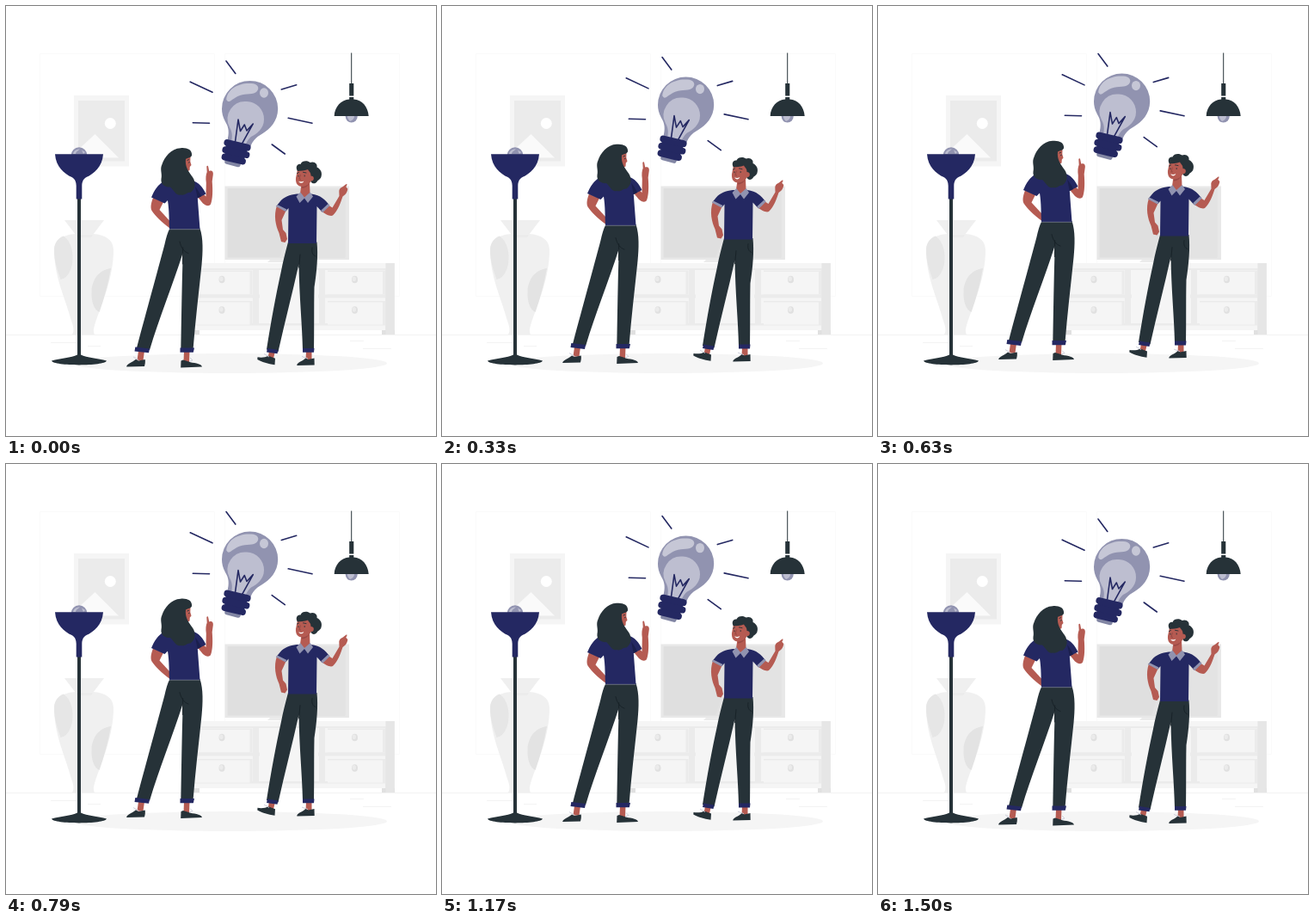
These frames come from a looping animation (500 by 500 pixels, 1.54 s). An HTML page:

```html
<!DOCTYPE html>
<html lang="en">
<head>
<meta charset="utf-8">
<title>Bright idea</title>
<style>
  html, body { margin: 0; width: 100%; height: 100%; overflow: hidden; background: #fff; }
  svg { display: block; width: 100vw; height: 100vh; }
  .navy { fill: #242862; }
  .fold { fill: #1b1f4d; }
  .dark { fill: #263238; }
  .skin { fill: #b55b52; }
  .shade { fill: #9b4a45; }
  .lilac { fill: #9193b0; }
  .pale { fill: #bdbed0; }
  .g1 { fill: #f5f5f5; }
  .g2 { fill: #ebebeb; }
  .g3 { fill: #e0e0e0; }
  .line { fill: none; stroke: #242862; stroke-width: 1.6; stroke-linecap: round; stroke-linejoin: round; }
  .faint { fill: none; stroke: #fafafa; stroke-width: 1; }
  .floor { fill: none; stroke: #f3f3f3; stroke-width: 1; }
  .crease { fill: none; stroke: #172126; stroke-width: .9; stroke-linecap: round; }
  .lace { fill: none; stroke: #c9cad8; stroke-width: .9; }
</style>
</head>
<body>
<svg viewBox="0 0 500 500">
  <defs>
    <g id="drawer">
      <rect class="g2" width="67" height="28"/>
      <rect class="g1" width="64" height="26" y="1.5"/>
      <ellipse class="g3" cx="31.5" cy="10.5" rx="3.5" ry="4.3"/>
      <ellipse class="g2" cx="30.8" cy="9.8" rx="2.2" ry="2.8"/>
    </g>
  </defs>

  <!-- room -->
  <path class="faint" d="M39.500 55.500H242.500V337.500H39.500ZM254.500 55.500H457.500V337.500H254.500Z"/>
  <path class="floor" d="M0 382.500H500M415 398.500H448M400 389.500H416M52 391.500H85M95 395.500H110"/>

  <!-- picture -->
  <rect class="g1" x="79" y="104" width="64" height="82.500"/>
  <rect class="g2" x="84" y="110" width="54" height="70.500"/>
  <circle cx="121.300" cy="136.500" r="6.500" fill="#fff"/>
  <path fill="#fafafa" d="M84 167 103.500 149 131 176.500H84Z"/>

  <!-- vase -->
  <path fill="#efefef" d="M68 249H114L101 266H81Z"/>
  <path fill="#f0f0f0" d="M81 265H101C116 266 125 272 125 284C125 315 112 345 104 368C102 374 101 378 103 382H77C80 377 78 372 76 366C69 340 56 315 56 284C56 272 66 266 81 265Z"/>
  <path fill="#e6e6e6" d="M67 267.500C76 274 79 287 77 300C75 310 70 317 63.500 318C59 306 56 295 56 284C56 276 60 270 67 267.500Z"/>
  <path fill="#e3e3e3" d="M122 305C108 307 100 318 99.500 332C99 343 102 353 108.500 356C114 340 119 323 122 305Z"/>
  <path class="g2" d="M81 266H101L99 269H83Z"/>

  <!-- console -->
  <path class="g3" d="M218 377H225V382H218ZM437 377H452V382H437Z"/>
  <rect class="g2" x="218" y="299" width="234" height="78"/>
  <rect class="g1" x="218" y="307" width="223" height="70"/>
  <rect class="g1" x="218" y="299" width="224" height="6"/>
  <rect fill="#e6e6e6" x="441.500" y="299" width="10" height="83"/>
  <path class="g2" d="M287 307H294V371H287ZM364 307H371V371H364ZM218 335.500H441V339.500H218ZM218 369H441V371.500H218Z"/>
  <use href="#drawer" x="219.500" y="307.500"/>
  <use href="#drawer" x="219.500" y="343"/>
  <use href="#drawer" x="374" y="307.500"/>
  <use href="#drawer" x="374" y="343"/>
  <path class="g1" d="M295 309H363V369H295Z"/>

  <!-- television -->
  <path class="g2" d="M308 294H346L349 298H304Z"/>
  <rect fill="#e8e8e8" x="254.500" y="209.500" width="144.500" height="85.500"/>
  <rect fill="#dfdfdf" x="257.500" y="212" width="137" height="80.500"/>
  <path fill="#e3e3e3" d="M345 212H394.500V292.500H318Z"/>

  <ellipse class="g1" cx="260" cy="415.500" rx="183" ry="11.500"/>

  <!-- floor lamp -->
  <circle class="lilac" cx="85" cy="173.500" r="9.300"/>
  <path class="pale" d="M78 172C79 168 82 166.500 86 166.500C83 168.500 81 170 81 172ZM88 167.500L92 170 90 172Z"/>
  <rect class="dark" x="83" y="220" width="4" height="188"/>
  <path class="dark" d="M83 405.500H87C94 409 107 409.500 117 412.500C115 419 55 419 53 412.500C63 409.500 76 409 83 405.500Z"/>
  <path class="navy" d="M57 172.300H113C112 187 102 195.500 93.500 199C89 201.500 88.500 205.500 88.300 209V224.500H81.700V209C81.500 205.500 81 201.500 76.500 199C68 195.500 58 187 57 172.300Z"/>

  <!-- pendant lamp -->
  <circle class="lilac" cx="401.700" cy="128.500" r="7"/>
  <path class="pale" d="M397 128H405C405 131 403 133 400 134C398 132 397 130 397 128Z"/>
  <path class="dark" d="M401.200 54.500H402.200V90H404.300V104.500H399.200V90H401.200ZM399.200 106H404.300V108.500C414 109 421 117 421.700 128H381.700C382 117 390 109 399.200 108.500Z"/>

  <g id="float">
    <!-- rays -->
    <path class="line" d="M256 64 266.800 78.500M214.200 88.200 240 100.300M217.300 135.700 236.500 136.200M320.300 97 337.700 91.800M328.200 130.300 356 136.200M309.200 161 324.300 172"/>

    <!-- bulb -->
    <path class="lilac" d="M251 119.500A32.600 32.600 0 0 1 316.200 119.500C316 134 307 143 298 148.500C290 153 287 157 284.500 163L257 158C260 147 259 141 255 134.500C252 129 251 124 251 119.500Z"/>
    <path class="pale" d="M280 111A20.500 20.500 0 0 1 300 132C300 143 291 149 285 152C281 155 280 159 278 162L262 158C264 149 262 145 260 141A20.500 20.500 0 0 1 280 111Z"/>
    <path fill="#c6c7d6" d="M256.200 109C257 97 270 89 285 90C293 90.500 295 95 292 99C288 104 279 101 272 104C264 107 261 112 258 111Z"/>
    <ellipse fill="#c6c7d6" cx="300" cy="101" rx="5" ry="5.700"/>
    <path class="line" d="M266.500 158 270 132 272.500 145.500 277.300 138 280 145 287.300 137 274 161"/>
    <path d="M257 181 270 184.500" stroke="#8286a4" stroke-width="5.500" stroke-linecap="round"/>
    <path class="navy" d="M256 158 282 164 276 181 254 176Z"/>
    <path d="M257.300 159 280.700 164.500M255.300 167.300 279.500 173M254.500 175.600 275 180.500" stroke="#242862" stroke-width="7.800" stroke-linecap="round"/>

    <!-- woman -->
    <g>
      <path class="skin" d="M154 401H161L159.500 412H152.500ZM207 401H213.500L213 414H206.500Z"/>
      <path class="dark" d="M140.200 419.500C140 416 147 414.500 151 410.800L154 412.500 161.700 411C162.200 414 161.500 417 161 419ZM203.500 412.500 206 411.500 212.500 413.500C217 415.500 227 415 228 419.500L203.200 420.500Z"/>
      <path class="lace" d="M148 408 154 411.500M214 409 217 412 213 413.500"/>
      <path class="skin" d="M171 223 183 228 178.500 237 190 249.500 190 258C181 251 174 245 169.500 238C167.500 234 169 228 171 223Z"/>
      <path class="skin" d="M222 221 229 218 232.500 221.500 232.800 205.500C232 200 232.500 196 233.700 193L233.300 186.500C234 185.300 235 185.700 235.200 187L236.200 192C239.500 190.500 241.300 193 240.800 196L239.700 204C240.500 214 240.500 224 238 230.500C236 233.500 232 232 229 229.500Z"/>
      <path class="dark" d="M190.500 258.500H225.500C229.500 270 229 286 227.500 301C224 335 220 367 217.500 400L203.300 399.500C204 362 204.500 325 205.700 287C194 324 178 363 167 400L152 397.500C164 353 176 309 184.500 277C186 270 188 263 190.500 258.500Z"/>
      <path class="crease" d="M202 274C203.500 281 207 286 212 287.500M205.700 281 205.400 300"/>
      <path class="navy" d="M150.300 396.500 167 398.500 166 403.300 149.500 401.500ZM202.500 397.500H219L217.800 402.700H202.500Z"/>
      <path class="navy" d="M184 203.500C177 207 172 215 169 222.500L184.500 229.500 188 226C190 238 189.500 250 190 259.500H225.500L222.800 223.500 232.500 218.500C229 211 224 205 217 203Z"/>
      <path class="fold" d="M220 210 222.800 223.500 227 221.300C225 217 222.500 213 220 210Z"/>
      <path d="M190 259.700H225.500" stroke="#a9abbf" stroke-width=".5"/>
      <path class="skin" d="M206 174 214.500 175 214.300 181 215.500 185 213.800 187 213.500 191C210 193.500 206 192 204 190Z"/>
      <path d="M213 178.500 210.500 179.500M213.700 181.500 212 182.300" stroke="#263238" stroke-width=".9"/>
      <path class="dark" d="M203 165.200C210 164.500 217 167 216 174C214 177 211 176.500 209 178C208 187 212 192 217 199C221.500 206 220 213 214.500 217C210 216 209 221 203 219.500C198 221 195 214 191 210.500C186 211 179.500 208 180.500 201C182 195 178.500 190 181.500 184C184 176 192 165.500 203 165.200Z"/>
    </g>

    <!-- man -->
    <g>
      <path class="skin" d="M306 401H313L311 410H304.500ZM349 401H355.500V412H348.500Z"/>
      <path class="dark" d="M292.500 408.300C297 409.300 302 408.500 305 406.800L313 409.800 312.500 417.200C305 416.500 297 413.500 292.300 411ZM338.300 418C338 414.500 344.500 413.500 348.500 409.300L351.500 411 358.500 409.500 358.700 417.500Z"/>
      <path class="lace" d="M300 404.500 306 408M344 407.500 351 410"/>
      <path class="skin" d="M315 232 326 237 320.500 249 322 260 325.500 264 327 271 324.500 275 320 274 317.500 264C313.500 255 311 244 315 232Z"/>
      <path class="skin" d="M366 238 374 231 379.500 234.500 387.500 221 387.300 215C388 211 391 211 393 209L396 206.700C397 207.300 396.500 208.500 395.300 210.200L397.300 212.500C397 217 394 220 391.500 221.500C389 229 386 238 380 243.500C377 245 371 242 366 238Z"/>
      <path class="dark" d="M328 274.500H361.500C363 290 361.500 308 358.500 327C358 352 358.500 378 358 400L345 399.500C344.500 372 341 338 340.500 300C333 334 324 368 316.500 402L303 399.500C308 368 314 335 320 308C322 297 325 286 328 274.500Z"/>
      <path class="crease" d="M342 289 340.600 304M356 281C355 287 357 290 360 291"/>
      <path class="navy" d="M304 398 316.500 400 315.500 404.300 303 402.500ZM345 398H358.500L358 402.800H345Z"/>
      <path class="navy" d="M338 218.500C330 219.500 323 222 319 227L314.500 232.500 325.500 238.500 328.500 235 328 276H361L361.500 233 367.500 239.500 376 231.500C371 225 366 220 355 218.500Z"/>
      <path class="lilac" d="M315.500 231 326.500 236.500 325 239 313.800 233ZM374.500 230 376.700 232 368.200 240.300 366.200 237.700Z"/>
      <path class="skin" d="M343.500 207 353 205 353.500 218 347 223.500 342 218Z"/>
      <path class="shade" d="M344 209.500 352.500 205.500C352 209 348 212 344 211.800Z"/>
      <path class="lilac" d="M342.300 216.500 347 222.500 353.800 216.500 357 221.500 351 229 347 223.500 341.500 229 337.500 221.500Z"/>
      <path class="skin" d="M339 190C344 185 353 186 357 193C358 201 353 209 345.500 210C339 210.500 336.500 206 337 200Z"/>
      <path class="dark" d="M339 192C336 187 339 183 342.500 184C344 179.500 351 179.500 353.500 182C359 180 362.500 184 361.500 187.500C366 189.500 368 194 366.500 198.500C365.500 202 362.500 202 361.500 204.500C359 207.500 355.500 206.500 354.500 204C356.500 201 357 198 354.500 197.500C354.500 193 352 192.500 351 190C347 191.500 342 191.500 339 192Z"/>
      <ellipse class="skin" cx="355.500" cy="200.500" rx="2.300" ry="2.800"/>
      <path fill="#fff" d="M340.300 203.700C342 204.700 344.500 204.500 346.300 203.500C345.600 206.300 341.300 206.800 340.300 203.700Z"/>
      <path fill="none" stroke="#263238" stroke-width=".9" stroke-linecap="round" d="M338.500 194.500 340.500 193.500M345.500 193.300 349 194M340 197.200V198.200M347.200 197V198"/>
      <path fill="none" stroke="#8b413d" stroke-width=".7" d="M342.500 196 341 201.300 343 201.500"/>
    </g>
  </g>
</svg>
<script>
  // Steady rise and fall; the loop holds one extra tick beyond the swing.
  const LOOP = 1540, SWING = 1500, LEAD = 37, RISE = 10;
  const float = document.getElementById('float');
  const start = performance.now();

  function height(time) {
    const phase = ((time % LOOP + LEAD) % SWING) / SWING;
    return RISE * (1 - Math.abs(2 * phase - 1));
  }

  const rest = height(0);

  function draw() {
    const y = rest - height(performance.now() - start);
    float.setAttribute('transform', `translate(0 ${y.toFixed(3)})`);
    requestAnimationFrame(draw);
  }

  draw();
</script>
</body>
</html>
```
